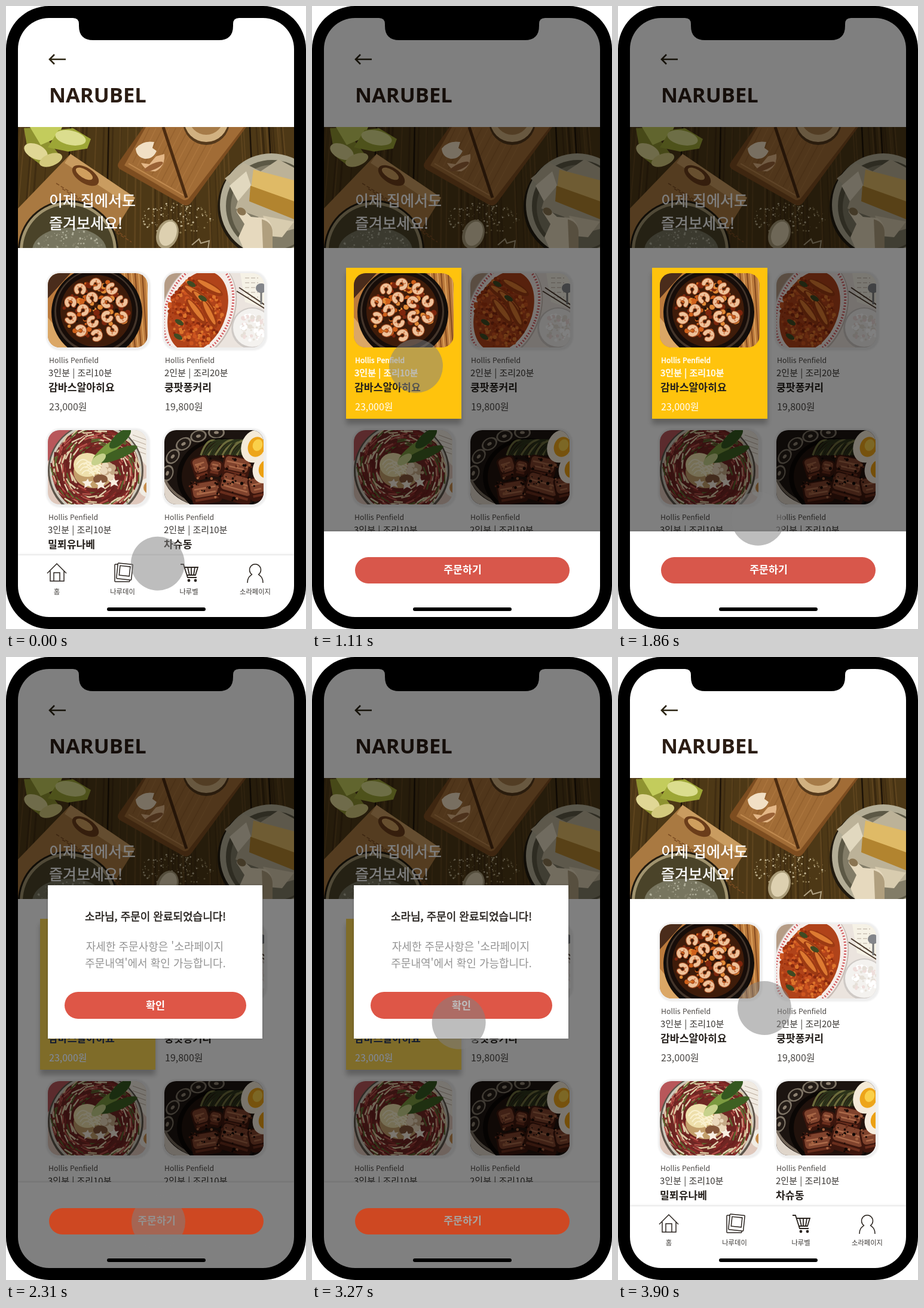
An HTML page for the animation above (4170 ms loop, 502 by 1040 pixels).

```html
<!DOCTYPE html>
<html lang="ko">
<head>
<meta charset="utf-8">
<style>
html,body{margin:0;width:100%;height:100%;overflow:hidden;background:#fff}
svg{display:block}
text{font-family:"Noto Sans CJK KR","Noto Sans CJK JP","Noto Sans",sans-serif}
.title{font-family:"Open Sans","Noto Sans",sans-serif}
</style>
</head>
<body>
<svg id="stage" width="502" height="1040" viewBox="0 0 502 1040"></svg>
<script>
const LOOP = 4170, FADE = 210;
const SHEET_AT = 900, MODAL_AT = 2070, CLOSE_AT = 3330;
const AUTHOR = 'Hollis Penfield';

let seed = 7;
const rnd = () => (seed = seed * 16807 % 2147483647) / 2147483647;
const times = (n, f) => Array.from({length: n}, (_, i) => f(i)).join('');
const rect = (x, y, w, h, fill, rx = 0, more = '') =>
  `<rect x="${x}" y="${y}" width="${w}" height="${h}" rx="${rx}" fill="${fill}" ${more}/>`;
const oval = (x, y, rx, ry, fill, turn = 0, more = '') =>
  `<ellipse cx="${x}" cy="${y}" rx="${rx}" ry="${ry}" fill="${fill}" transform="rotate(${turn} ${x} ${y})" ${more}/>`;
const disc = (x, y, r, fill, more = '') => oval(x, y, r, r, fill, 0, more);
const path = (d, fill) => `<path d="${d}" fill="${fill}"/>`;
const line = (d, color, w = 1.5, more = '') =>
  `<path d="${d}" fill="none" stroke="${color}" stroke-width="${w}" ${more}/>`;
const text = (x, y, size, s, fill, weight = 400, more = '') =>
  `<text x="${x}" y="${y}" font-size="${size}" fill="${fill}" font-weight="${weight}" ${more}>${s}</text>`;
const mid = 'text-anchor="middle"';
// medium weight: a hairline outline in the text colour
const medium = color => `stroke="${color}" stroke-width=".5"`;
// random specks inside an ellipse
const specks = (n, x, y, rx, ry, colors, r) => times(n, i => {
  const a = rnd() * 6.283, d = Math.sqrt(rnd());
  return disc(x + Math.cos(a) * d * rx, y + Math.sin(a) * d * ry, r * (.5 + rnd()), colors[i % colors.length]);
});

function hero() {
  const wood = times(70, () => {
    const x = 20 + rnd() * 462;
    return line(`M${x} 202L${x + (x - 250) * .08} 404`, rnd() < .5 ? '#6a4e24' : '#38270f', 1 + rnd() * 2, 'opacity=".6"');
  });
  const seams = [108, 172, 408, 440].map(x => line(`M${x} 202L${x + (x - 250) * .06} 404`, '#1c1207', 2.5)).join('');
  const print = times(8, i => line(`M${84 + i * 10} ${296 + i * 9}l56 35`, '#7a4c22', 1.5, 'stroke-dasharray="6 3"'));
  return `<g clip-path="url(#hero)">${rect(20, 202, 462, 202, '#4d3816')}${wood}${seams}
    ${path('M30 204L66 202L72 226L88 247L62 268L38 250Z', '#8f9330')}
    ${path('M40 202H94L86 220L58 232Z', '#c3cc5c')}
    ${path('M70 236L88 207L112 204L142 222L136 238L104 243Z', '#9da636')}
    ${oval(108, 220, 26, 12, '#dbdd8e', 12)}${oval(50, 243, 21, 12, '#e0d795', 25)}${oval(75, 257, 20, 10, '#d3c97d', -20)}
    ${path('M108 247L216 320L164 404H20V338Z', '#a97941')}
    ${path('M108 247L216 320L208 334L98 262Z', '#c99c60')}
    ${print}${oval(133, 283, 25, 13, '#6b3d1a', 32)}${oval(131, 280, 16, 7, '#cf9f5e', 32)}
    ${path('M230 202H402L310 328Q302 337 293 330L190 272Q184 267 190 259Z', '#7d4d20')}
    ${path('M234 202H398L306 321Q301 327 294 322L198 266Z', '#a16c36')}
    ${times(12, i => line(`M${240 + i * 11} 204L${212 + i * 8} ${262 + i * 5}`, i % 2 ? '#b57e45' : '#8d5b2b', 1.5, 'opacity=".6"'))}
    ${line('M263 202L302 320', '#4b2b10', 5)}${line('M205 263L297 316', '#c08a50', 2)}
    ${disc(335, 193, 39, '#55391b')}${disc(335, 190, 37, '#d1b181')}${disc(335, 186, 29, '#a67b48')}
    ${path('M217 238Q228 224 248 227L245 237L252 242Q246 256 232 255Q218 252 217 238Z', '#f1dfc4')}
    ${path('M226 262L240 264L251 251L265 247Q267 268 250 276Q234 277 226 262Z', '#e4b787')}
    ${oval(247, 268, 17, 5, '#9a6236', -24)}
    ${specks(130, 285, 355, 62, 26, ['#c3b695', '#8d7a50'], 1.1)}
    ${disc(104, 408, 84, '#211a0f')}${disc(104, 408, 81, '#a1946f')}${disc(104, 408, 76, '#4a4329')}
    ${oval(106, 408, 62, 38, '#77755f')}${specks(140, 106, 405, 58, 32, ['#b0af9a', '#87846e'], 1.3)}
    ${oval(270, 381, 18, 25, '#a99b78', 20)}${oval(271, 380, 14, 21, '#ddd0b0', 20)}
    ${line('M311 399l12-10 3 7 14-4-2 14', '#b0a182', 2)}
    ${disc(440, 335, 86, '#211a0f')}${disc(444, 332, 86, '#b3ad96')}${disc(445, 334, 77, '#5c5845')}${disc(447, 336, 71, '#827c67')}
    ${path('M366 288L398 262L426 276L456 256L482 270V372L440 384L422 352L384 338L392 312Z', '#bcb298')}
    ${path('M374 300L402 276L410 300L388 326Z', '#e1d8bf')}${path('M430 350L482 360L462 386L440 384Z', '#d8ccaf')}
    ${path('M414 273L482 291V337L409 312Z', '#dfba66')}${path('M409 300L482 326V356L407 326Z', '#b2842f')}
    ${path('M386 344Q386 336 395 338L410 352L434 354Q446 361 446 378V404H397L389 386L399 364Z', '#e6d9be')}
    ${oval(394, 343, 8, 6, '#8a7451', 30)}${path('M428 356Q446 361 446 378V404H430Z', '#b09f7e')}
  </g>${text(72, 334, 25, '이제 집에서도', '#fff', 400, medium('#fff'))}${text(72, 372, 25, '즐겨보세요!', '#fff', 400, medium('#fff'))}`;
}

function shrimpPan() {
  const shrimp = (x, y, a) => `<g transform="translate(${x} ${y}) rotate(${a}) scale(.95)">
    ${line('M-6 4A7 7 0 1 1 4 6', '#a04a20', 9, 'stroke-linecap="round"')}
    ${line('M-6 4A7 7 0 1 1 4 6', '#efc29a', 6.5, 'stroke-linecap="round"')}
    ${line('M-4 -6l2 3M4 -6l-1 3', '#d47e4e', 2)}</g>`;
  const ring = (n, r, off) => times(n, i => {
    const a = i / n * 6.283 + off;
    return shrimp(151 + Math.cos(a) * r, 507 + Math.sin(a) * r * .95, rnd() * 360);
  });
  return rect(70, 446, 167, 124, '#bb7a3c')
    + times(12, i => line(`M${180 + i * 6} 446L${196 + i * 5} 570`, i % 2 ? '#dba05c' : '#854a1f', 2))
    + path('M70 446H108L70 488Z', '#4a2c1b') + path('M70 520L112 570H70Z', '#dba766')
    + disc(152, 512, 76, '#120d0a') + disc(151, 510, 70, '#44352a') + disc(151, 509, 67, '#170d09')
    + disc(151, 509, 60, '#3f1c0a') + specks(110, 151, 508, 54, 50, ['#d0601a', '#7e260d', '#e28b36', '#1f0f08'], 3.6)
    + ring(10, 45, .3) + ring(5, 22, .6);
}

function curry() {
  return rect(264, 446, 169, 124, '#ebe4de') + path('M264 446H300L264 500Z', '#b59c86')
    + path('M392 446H433V505L400 494Z', '#f6f2e6')
    + times(5, i => line(`M400 ${454 + i * 8}h22`, '#b5a89b', 1, 'stroke-dasharray="7 3"'))
    + oval(322, 509, 60, 86, '#c9bdb6', 22) + oval(322, 508, 58, 84, '#f5ece8', 22)
    + oval(322, 508, 54, 80, 'none', 22, 'stroke="#d0565a" stroke-width="4" stroke-dasharray="2 3"')
    + oval(321, 510, 47, 70, '#b0431a', 22) + specks(320, 317, 512, 45, 58, ['#cd5520', '#86290f', '#dd742c', '#a5350f'], 2.4)
    + [[318, 481, 8], [330, 494, 20], [318, 510, 28], [340, 470, 4], [340, 514, 38]].map(p =>
      oval(p[0], p[1], 26, 8, '#9c3a13', p[2] + 25) + oval(p[0], p[1] - 2, 22, 4, '#dd7a31', p[2] + 25)).join('')
    + [[310, 464], [329, 488], [288, 552], [290, 528]].map(p => oval(p[0], p[1], 8, 4, '#3f4a22', 30)).join('')
    + line('M390 470L433 499M386 476L433 505', '#4c3b2f', 2)
    + oval(427, 471, 9, 8, '#83858a') + line('M427 478V498', '#777', 3)
    + disc(412, 538, 35, '#cfcac6') + disc(412, 537, 32, '#f4f2ef')
    + specks(65, 412, 537, 23, 23, ['#fff', '#e6e0d8', '#efdedb'], 2.8);
}

function hotpot() {
  const colors = ['#8a2a28', '#e4d3b2', '#5c6b30', '#b5524a', '#dcc8a0', '#6c1e1e'];
  const slices = times(330, i => {
    const a = i * 2.4, r = 30 + 43 * Math.sqrt(rnd()), tilt = a + 1.35 + rnd() * .5;
    return line(`M${150 + Math.cos(a) * r} ${775 + Math.sin(a) * r * .97}l${Math.cos(tilt) * 15} ${Math.sin(tilt) * 15}`, colors[i % 6], 2.4);
  });
  const star = (x, y) => path(`M${x} ${y - 8}l2 5 6-1-4 5 3 6-7-3-6 4 1-7-5-4 7-1z`, '#f8eee0');
  return rect(70, 708, 167, 124, '#dfc8bc') + path('M70 708H112L70 760Z', '#b8575a')
    + path('M205 708H237V770L214 744Z', '#f1ebe2') + times(4, i => line(`M212 ${716 + i * 8}l22 8`, '#b6a798', 1))
    + disc(238, 804, 16, '#f1ece3') + disc(240, 804, 10, '#c78e4e')
    + disc(150, 776, 80, '#5d544a') + disc(150, 775, 77, '#cfcabc') + disc(150, 775, 73, '#6f2723') + slices
    + oval(147, 778, 34, 27, '#c39f6b') + oval(136, 766, 23, 20, '#eedfab')
    + times(12, i => line(`M${118 + i * 3} ${766 + i % 4 * 5}q10-${18 - i} 24 ${i % 5 * 3}`, '#faf1cf', 2))
    + specks(14, 173, 773, 14, 14, ['#ecdabd', '#c5a986'], 5)
    + oval(158, 790, 12, 8, '#85573a') + star(137, 797) + star(159, 799) + star(181, 795)
    + oval(172, 740, 34, 9, '#7b9a40', -38) + oval(188, 748, 34, 8, '#3f6022', -22) + oval(191, 722, 23, 9, '#345820', -42)
    + oval(155, 757, 14, 7, '#c7d18c', -36);
}

function braised() {
  const meat = (x, y, w, h, a) => `<g transform="rotate(${a} ${x + w / 2} ${y + h / 2})">
    ${rect(x, y, w, h, '#3c160d', 7)}${rect(x + 3, y + 2, w - 6, h * .62, '#80432d', 6)}
    ${line(`M${x + 6} ${y + h * .3}h${w - 14}M${x + 9} ${y + h * .52}h${w - 18}`, '#ab6a4a', 2.5)}
    ${line(`M${x + 5} ${y + h * .78}h${w - 10}`, '#6a2e1d', 4)}</g>`;
  return rect(264, 708, 169, 124, '#1c1410') + path('M264 790Q274 820 310 832H264Z', '#dfd5ca')
    + line('M264 786Q278 822 324 834', '#776a5d', 4)
    + [[322, 718, -14], [297, 731, -32], [279, 752, -50], [270, 780, -70], [352, 712, 0]].map(p =>
      oval(p[0], p[1], 14, 10, '#7d7365', p[2]) + oval(p[0], p[1], 11, 8, '#241c17', p[2]) + oval(p[0], p[1], 4, 2.500, '#8d8070', p[2])).join('')
    + oval(360, 786, 74, 65, '#0b0705') + oval(363, 786, 69, 60, '#21120c')
    + times(22, i => line(`M${326 + i * 4} 750q${10 + i % 4 * 4}-30 ${25 + i % 5 * 7}-24`, i % 3 ? '#2c331a' : '#6c6c3c', 3.5))
    + meat(312, 752, 30, 38, -18) + meat(338, 758, 24, 27, 12) + meat(362, 752, 46, 36, 12)
    + meat(310, 793, 50, 38, -10) + meat(356, 782, 58, 46, 16) + meat(406, 786, 30, 40, -12)
    + specks(90, 362, 790, 58, 38, ['#a3613f', '#0f0704', '#642c1b', '#1d0c07'], 1.8)
    + oval(416, 735, 22, 28, '#f4ead8', 20) + oval(419, 736, 14, 17, '#eda51a', 20) + oval(421, 733, 8, 10, '#fad04a', 20)
    + oval(432, 773, 19, 24, '#f6ecdd', 15) + oval(435, 773, 12, 15, '#eca012', 15);
}

const photo = (id, x, y, w, art) =>
  `<clipPath id="c${id}">${rect(x, y, w, 124, '#000', 20)}</clipPath><g id="${id}" clip-path="url(#c${id})">${art}</g>`;
const halo = (x, y, w) => rect(x - 3, y - 3, w + 8, 132, '#efefef', 23, 'filter="url(#soft)"');
const label = (x, y, info, name, price, light) =>
  text(x + 1, y, 12.3, AUTHOR, light ? '#fff' : '#4c4845', 400, light ? medium('#fff') : '')
  + text(x, y + 22, 15, info, light ? '#fff' : '#3b3835', 400, light ? medium('#fff') : '')
  + text(x, y + 47, 17.2, name, '#25201c', 700)
  + (price ? text(x + 1, y + 79, 16, price, light ? '#fff' : '#4a4744') : '');
const DISH = ['3인분 | 조리10분', '감바스알아히요', '23,000원'];

const ICON = '#2b2520';
const nav = rect(20, 917, 462, 110, '#fff', 0, 'filter="url(#drop)"')
  + line('M69 947L85 931L101 947M74 943V960H97V943M80 960V946H90V960', ICON)
  + rect(182, 932, 25, 29, '#fff', 1, `stroke="${ICON}" stroke-width="1.5"`)
  + `<g transform="rotate(6 198 944)">${rect(186, 931, 25, 26, '#fff', 1, `stroke="${ICON}" stroke-width="1.5"`)}
    ${rect(190, 935, 17, 16, 'none', 0, `stroke="${ICON}" stroke-width="1.5"`)}</g>`
  + line('M292 932H297L304 954H319M298 937H321L317 950H303M304 937L307 950M310 937V950M316 937L314 950', ICON, 1.8)
  + disc(306, 959, 2.4, ICON) + disc(317, 959, 2.4, ICON)
  + line('M404 963C404 953 409 951 411.5 949A9.5 9.5 0 1 1 422.5 949C425 951 430 953 430 963', ICON)
  + [[85, '홈'], [195, '나루데이'], [306, '나루벨'], [417, '소라페이지']].map(p => text(p[0], 982, 11.3, p[1], '#3b3835', 400, mid)).join('');

const page = rect(0, 0, 502, 1040, '#fff')
  + line('M100 89H74M81 81L73 89L81 97', '#2b2412', 2.6)
  + text(72, 161, 34.5, 'NARUBEL', '#2b1d14', 700, 'class="title"')
  + hero()
  + halo(70, 446, 167) + halo(265, 446, 167) + halo(70, 708, 166) + halo(265, 708, 166)
  + photo('pan', 70, 446, 167, shrimpPan()) + photo('curry', 265, 446, 167, curry())
  + photo('hotpot', 70, 708, 165, hotpot()) + photo('braised', 265, 708, 166, braised())
  + label(71, 596, ...DISH) + label(265, 596, '2인분 | 조리20분', '쿵팟퐁커리', '19,800원')
  + label(70, 858, '3인분 | 조리10분', '밀푀유나베') + label(264, 858, '2인분 | 조리10분', '차슈동') + nav;

const order = (fill, ink) => rect(72, 920, 359, 44, fill, 22) + text(252, 947, 17.3, '주문하기', ink, 700, mid);
const sheet = rect(57, 437, 193, 252, '#ffc30c', 0, 'filter="url(#lift)"')
  + '<use href="#pan"/>' + label(71, 596, ...DISH, true)
  + rect(20, 877, 462, 150, '#fff', 0, 'filter="url(#drop)"') + order('#d8574b', '#fff');

const dim = rect(57, 437, 193, 252, '#001646', 0, 'opacity=".5"') + rect(20, 877, 462, 150, '#808080') + order('#ce4822', '#a9a39f');
const modal = rect(70, 381, 359, 256, '#fff', 0, 'filter="url(#drop)"')
  + text(250, 440, 18, '소라님, 주문이 완료되었습니다!', '#25201c', 400, mid + ' ' + medium('#25201c'))
  + text(249, 490, 18, "자세한 주문사항은 '소라페이지", '#939393', 400, mid)
  + text(250, 518, 18, "주문내역'에서 확인 가능합니다.", '#939393', 400, mid)
  + rect(98, 559, 304, 45, '#de5647', 22.5) + text(250, 588, 17.5, '확인', '#fff', 700, mid);

const frame = `<path fill-rule="evenodd" d="M72 0H430A72 72 0 0 1 502 72V968A72 72 0 0 1 430 1040H72A72 72 0 0 1 0 968V72A72 72 0 0 1 72 0Z
  M72 20A52 52 0 0 0 20 72V968A52 52 0 0 0 72 1020H430A52 52 0 0 0 482 968V72A52 52 0 0 0 430 20H390Q380 20 380 30V33Q380 57 356 57H146Q122 57 122 33V30Q122 20 112 20Z"/>`;
const shadow = (id, dy, blur, alpha) => `<filter id="${id}" x="-20%" y="-20%" width="140%" height="140%">
  <feDropShadow dx="0" dy="${dy}" stdDeviation="${blur}" flood-opacity="${alpha}"/></filter>`;

document.getElementById('stage').innerHTML = `<defs>${shadow('drop', 0, 2, .22)}${shadow('lift', 9, 4, .25)}
  <filter id="soft"><feGaussianBlur stdDeviation="1"/></filter>
  <clipPath id="hero">${rect(20, 202, 462, 202, '#000')}</clipPath>
  <clipPath id="phone">${rect(1, 1, 500, 1038, '#000', 71)}</clipPath></defs>
  <g clip-path="url(#phone)">${page}<g id="shade">${rect(0, 0, 502, 1040, '#000', 0, 'opacity=".5"')}</g>
  <g id="sheet">${sheet}</g><g id="modal">${dim}${modal}</g></g>
  ${frame}${rect(169, 1004, 165, 6, '#000', 3)}
  <circle id="touch" r="45" fill="#808080" fill-opacity=".52"/>`;

// time, x, y
const TOUCH = [[0, 254, 931], [900, 174, 601], [1280, 174, 601], [2060, 255, 943], [2515, 255, 943], [3325, 245, 586], [LOOP, 245, 586]];
const clamp = v => Math.min(1, Math.max(0, v));
const ramp = (t, start) => clamp((t - start) / FADE);
const [shadeEl, sheetEl, modalEl, touchEl] = ['shade', 'sheet', 'modal', 'touch'].map(id => document.getElementById(id));

function draw() {
  const t = performance.now() % LOOP;
  const open = ramp(t, SHEET_AT) - ramp(t, CLOSE_AT);
  shadeEl.style.opacity = sheetEl.style.opacity = open;
  modalEl.style.opacity = ramp(t, MODAL_AT) - ramp(t, CLOSE_AT);
  const i = TOUCH.findIndex(p => p[0] > t), a = TOUCH[i - 1], b = TOUCH[i];
  const k = (t - a[0]) / (b[0] - a[0]);
  touchEl.setAttribute('cx', a[1] + (b[1] - a[1]) * k);
  touchEl.setAttribute('cy', a[2] + (b[2] - a[2]) * k);
  requestAnimationFrame(draw);
}
draw();
</script>
</body>
</html>
```
